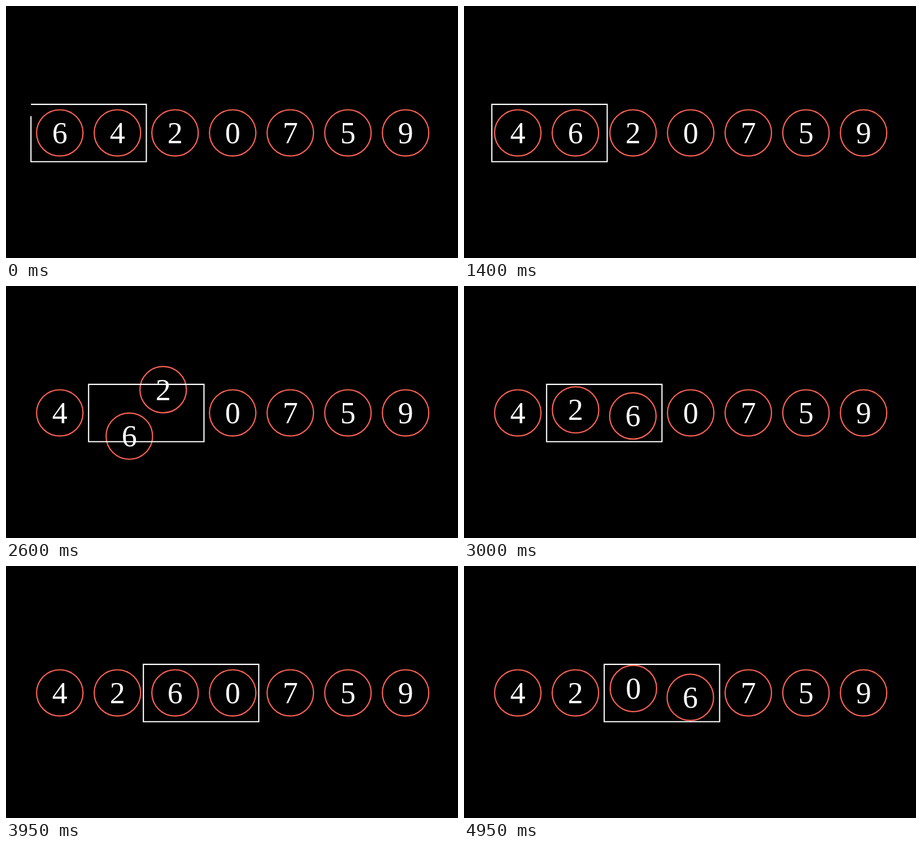
These frames come from a looping animation (800 px wide and 448 px high, 5000 ms). An HTML page:

```html
<!DOCTYPE html>
<html lang="en">
<head>
<meta charset="utf-8">
<title>Bubble sort</title>
<style>
  html, body { margin: 0; width: 100%; height: 100%; overflow: hidden; background: #000; }
  svg { display: block; width: 100vw; height: 100vh; }
  circle { fill: none; stroke: #fc6255; stroke-width: 2.2; }
  text { fill: #fff; font: 54px "Liberation Serif", serif; text-anchor: middle; }
  path { fill: none; stroke: #fff; stroke-width: 2.1; }
</style>
</head>
<body>
<svg id="stage" viewBox="0 0 800 448">
  <g id="balls"></g>
  <path id="frame" d="M44.2 174.9h204.2v101.8h-204.2z"/>
</svg>
<script>
const NS = "http://www.w3.org/2000/svg";
const LOOP = 5000, STEP = 50, PHASE = 30;
const X0 = 95.2, Y0 = 225.6, GAP = 102, R = 41.1;
const box = document.getElementById("frame");
const boxLength = box.getTotalLength();

function add(parent, tag, attrs = {}) {
  const el = parent.appendChild(document.createElementNS(NS, tag));
  for (const key in attrs) el.setAttribute(key, attrs[key]);
  return el;
}

const balls = [..."6420759"].map((digit, i) => {
  const g = add(document.getElementById("balls"), "g");
  add(g, "circle", { r: R });
  add(g, "text", { y: 18.2 }).textContent = digit;
  place(g, X0 + i * GAP, Y0);
  return g;
});

function place(el, x, y) {
  el.setAttribute("transform", `translate(${x.toFixed(2)} ${y.toFixed(2)})`);
}

// Sigmoid easing, rescaled to run exactly from 0 to 1
function smooth(t) {
  const sigmoid = x => 1 / (1 + Math.exp(-x));
  const tail = sigmoid(-5);
  return (sigmoid(10 * (t - 0.5)) - tail) / (1 - 2 * tail);
}

// Phases: 0 outline the box, then swap (odd) and shift (even) in turn
function draw(ms) {
  const tick = 24 + Math.ceil(1.5 * Math.floor((ms % LOOP) / STEP));
  const phase = Math.floor(tick / PHASE);
  const ease = smooth((tick % PHASE + 0.5) / PHASE);
  const progress = n => phase > n ? 1 : phase === n ? ease : 0;

  place(balls[0], X0, Y0);
  for (let j = 0; j < 3; j++) {
    const angle = Math.PI * progress(2 * j + 1);
    const mid = X0 + (j + 0.5) * GAP;
    const dx = GAP / 2 * Math.cos(angle), dy = GAP / 2 * Math.sin(angle);
    place(balls[j + 1], mid + dx, Y0 - dy);
    if (angle > 0) place(balls[0], mid - dx, Y0 + dy);
  }

  place(box, GAP * (progress(2) + progress(4)), 0);
  box.setAttribute("stroke-dasharray",
    phase ? "none" : `${ease * boxLength} ${boxLength}`);
}

const start = performance.now();
function loop() {
  draw(performance.now() - start);
  requestAnimationFrame(loop);
}
draw(0);
requestAnimationFrame(loop);
</script>
</body>
</html>
```
